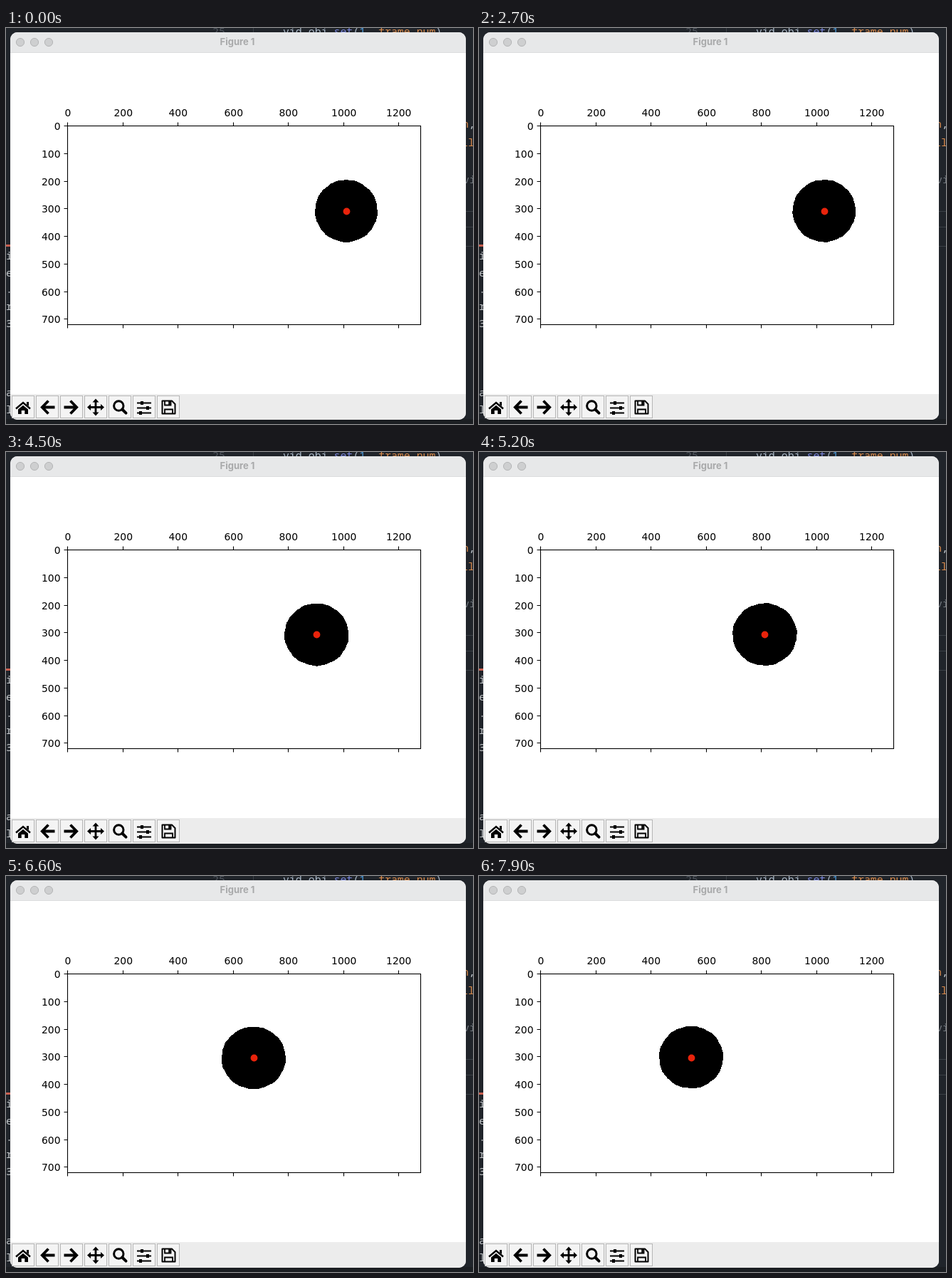
These frames come from a looping animation (656x556 px, 8000 ms). An HTML page:

```html
<!DOCTYPE html>
<html lang="en">
<head>
<meta charset="utf-8">
<title>Figure 1</title>
<style>
  html, body { margin: 0; width: 100%; height: 100%; overflow: hidden; background: #20242a; }
  svg { display: block; width: 656px; height: 556px; }
  .code { font: 14.9px "Noto Sans Mono", monospace; white-space: pre; }
  .axis { font: 13.9px "DejaVu Sans", sans-serif; }
  .title { font: 700 13px Inter, sans-serif; fill: #a8a9aa; }
  .icon { fill: none; stroke: #000; }
</style>
</head>
<body>
<svg viewBox="0 0 656 556" xmlns="http://www.w3.org/2000/svg">
  <rect width="656" height="556" fill="#20242a"/>
  <rect y="549" width="656" height="7" fill="#1b1e22"/>
  <g class="code" fill="#a9b7c6">
    <text x="290" y="10" fill="#50565e">25</text>
    <path d="M347.5 0V6" stroke="#3a3f45"/>
    <text x="389" y="9.5">vid_obj.<tspan fill="#7a86dd">set</tspan>(<tspan fill="#4f9fe0">1</tspan><tspan fill="#d98a4b">, frame_num</tspan>)</text>
    <text x="641" y="140" fill="#d98a4b">n<tspan fill="#c5ccd3">,</tspan></text>
    <text x="640" y="166" fill="#d98a4b">il</text>
    <text x="642" y="218" fill="#71777e">vi</text>
    <path d="M646 257.5H656M646 279.5H656M646 306.5H656" stroke="#3b4046"/>
  </g>
  <path d="M0 305.5H7" stroke="#c95f50" stroke-width="3"/>
  <g id="terminal" class="code" fill="#c3c7ca"></g>

  <rect x="6" y="6" width="640" height="544" rx="10" fill="#fff"/>
  <path d="M6 35V16a10 10 0 0 1 10-10H636a10 10 0 0 1 10 10V35Z" fill="#e7e8e9"/>
  <path d="M6 34.5H646" stroke="#dcddde"/>
  <g fill="#cecfd0" stroke="#b4b5b6">
    <circle cx="20" cy="20" r="5.6"/><circle cx="40" cy="20" r="5.6"/><circle cx="60" cy="20" r="5.6"/>
  </g>
  <text class="title" x="325" y="24.3" text-anchor="middle">Figure 1</text>

  <path id="blob" shape-rendering="crispEdges"/>
  <circle id="dot" r="4.9" fill="#e8230b"/>
  <rect x="86.5" y="137.5" width="496" height="279" fill="none" stroke="#000" stroke-width="1.1"/>
  <path id="ticks" stroke="#000" stroke-width="1.1"/>
  <g id="labels" class="axis"></g>

  <path d="M6 514H646V540a10 10 0 0 1-10 10H16a10 10 0 0 1-10-10Z" fill="#ececec"/>
  <g id="buttons" fill="#f4f4f4" stroke="#b7b7b7"></g>
  <g class="icon">
    <path d="M14 534.5L24 526L34 534.5" stroke-width="2.4"/>
    <path d="M29 525H32V531L29 528.5ZM17 535.5L24 529.7L31 535.5V542H26.3V537H21.7V542H17Z" fill="#000" stroke="none"/>
    <path d="M59.5 523.5L50.8 532.5L59.5 541.5M51 532.5H68.5" stroke-width="3.8"/>
    <path d="M90.5 523.5L99.2 532.5L90.5 541.5M99 532.5H81.5" stroke-width="3.8"/>
    <path d="M126 524V541M117.500 532.5H134.500" stroke-width="2.8"/>
    <path d="M126 520.5L130.500 525.500H121.500ZM126 544.500L130.500 539.500H121.500ZM114 532.500L119 528V537ZM138 532.500L133 528V537Z" fill="#000" stroke="none"/>
    <circle cx="158.300" cy="530.500" r="6.700" stroke-width="3"/>
    <path d="M163.300 535.500L168.500 540.700" stroke-width="4" stroke-linecap="round"/>
    <path d="M184 526.500H204M184 533.500H204M184 540.500H204" stroke-width="1.800"/>
    <path d="M191 524V529M199 531V536M189 538V543" stroke-width="4"/>
    <path d="M219.500 523.500H233L237.500 528V541.500H219.500Z" stroke-width="2" stroke-linejoin="round"/>
    <path d="M223 524V529.500H231.500V524M223 541V535.500H234V541" stroke-width="1.800"/>
    <path d="M229.500 524V529" stroke-width="2.500"/>
  </g>
</svg>
<script>
const LOOP = 8000, STEP = 100;
const $ = id => document.getElementById(id);

// Static parts
const SCALE = 496 / 1280;
let ticks = "", labels = "";
for (let v = 0; v <= 1200; v += 200) {
  const x = 86.5 + Math.round(v * SCALE);
  ticks += `M${x} 132.5V137M${x} 417V421.5`;
  labels += `<text x="${x + 0.3}" y="124" text-anchor="middle">${v}</text>`;
}
for (let v = 0; v <= 700; v += 100) {
  const y = 137.5 + Math.round(v * SCALE);
  ticks += `M81.5 ${y}H86`;
  labels += `<text x="76.500" y="${y + 5}" text-anchor="end">${v}</text>`;
}
$("ticks").setAttribute("d", ticks);
$("labels").innerHTML = labels;

$("buttons").innerHTML = Array.from({ length: 7 }, (_, i) =>
  `<rect x="${8.5 + 34 * i}" y="516.5" width="31" height="31"/>`).join("");

const lines = [["ki", 325], ["se", 349], ["v.", 372], ["yr", 396], ["=3", 420],
  [" c", 469, "#35a02c"], ["ma", 517], ["ol", 541]];
$("terminal").innerHTML = lines.map(([text, y, fill = "#c3c7ca"]) =>
  `<text x="-9" y="${y}" fill="${fill}">${text}</text>`).join("");

// Motion: [seconds, value]
const pathX = [[0, 478], [0.9, 481.5], [1.4, 483.6], [2.2, 485.8], [2.7, 484.8], [3.7, 470],
  [4.5, 436.3], [5.4, 392], [6, 370], [6.4, 355.5], [7.1, 328.4], [7.9, 298]];
const pathY = [[0, 256.8], [1.4, 256.9], [3.7, 256.6], [4.5, 256.4], [6, 255.8], [7.1, 255], [7.9, 254.5]];
const radiusX = [[0, 43.9], [2.2, 43.9], [3.7, 45], [7.9, 45]];

// Cubic Hermite curve through the keys
function sample(keys, t) {
  const last = keys.length - 1;
  let i = 0;
  while (i < last - 1 && t > keys[i + 1][0]) i++;
  const slope = k => {
    const a = keys[Math.max(k - 1, 0)], b = keys[Math.min(k + 1, last)];
    return (b[1] - a[1]) / (b[0] - a[0]);
  };
  const [t0, v0] = keys[i], [t1, v1] = keys[i + 1];
  const h = t1 - t0, u = (t - t0) / h, w = 1 - u;
  return v0 * (1 + 2 * u) * w * w + slope(i) * h * u * w * w
       + v1 * (3 - 2 * u) * u * u - slope(i + 1) * h * w * u * u;
}

function blobPath(cx, cy, rx, ry, seed) {
  const points = [];
  for (let i = 0; i < 90; i++) {
    const a = i * Math.PI / 45;
    const rough = 0.3 * Math.sin(9 * a + seed * 2.1) + 0.25 * Math.sin(23 * a + seed * 3.7);
    points.push(`${(cx + (rx + rough) * Math.cos(a)).toFixed(2)} ${(cy + (ry + rough) * Math.sin(a)).toFixed(2)}`);
  }
  return `M${points.join("L")}Z`;
}

function draw(ms) {
  const step = Math.floor((ms % LOOP) / STEP);
  const t = step * STEP / 1000;
  const x = sample(pathX, t), y = sample(pathY, t);
  $("blob").setAttribute("d", blobPath(x, y, sample(radiusX, t), 43.7, step));
  $("dot").setAttribute("cx", Math.round(x) + 0.5);
  $("dot").setAttribute("cy", Math.round(y) + 0.5);
}

const start = performance.now();
function tick() {
  draw(performance.now() - start);
  requestAnimationFrame(tick);
}
tick();
</script>
</body>
</html>
```
